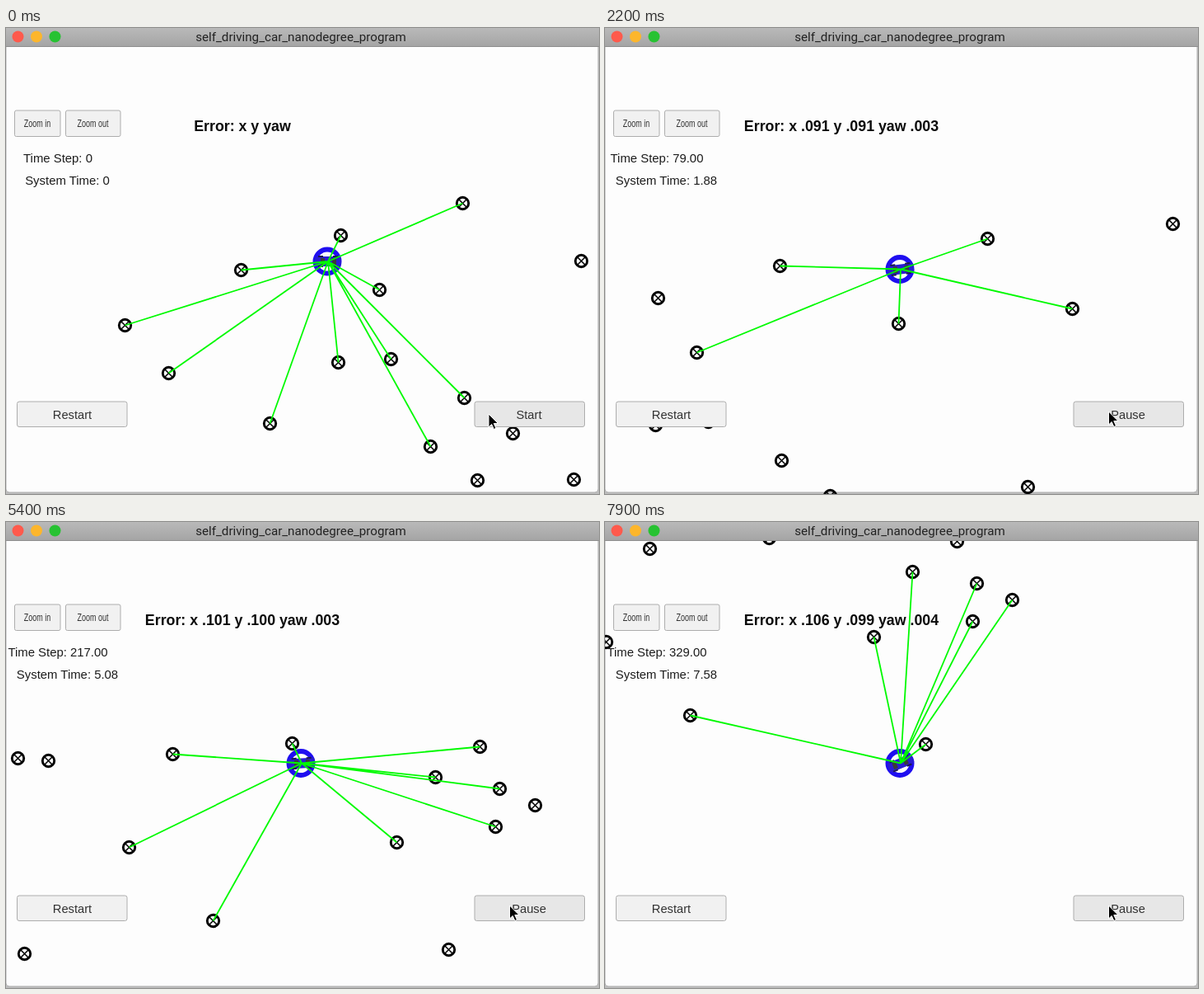
Write an HTML page that moves like this. It is 720 by 565 pixels and loops after 8000 ms.

```html
<!DOCTYPE html>
<html lang="en">
<head>
<meta charset="utf-8">
<title>Particle filter simulator</title>
<style>
  html, body { margin: 0; width: 100%; height: 100%; overflow: hidden; background: #bdbdbd; }
  svg { display: block; width: 720px; height: 565px; font-family: "Liberation Sans", Arial, sans-serif; }
  text { text-anchor: middle; fill: #1c1c1c; font-size: 14.9px; }
  .button rect { fill: #f1f1f1; stroke: #adadad; stroke-width: 1; }
  .button .hover { fill: #e7e7e7; }
  .button text { fill: #323232; font-size: 14.7px; }
  .title { font: 15.16px Roboto, sans-serif; fill: #222; }
  .error { font-size: 17.8px; font-weight: bold; fill: #0c0c0c; }
  .button .small { font-size: 12px; }
</style>
</head>
<body>
<svg viewBox="0 0 720 565">
  <defs>
    <linearGradient id="bar" x2="0" y2="1">
      <stop offset="0" stop-color="#b9b9b9"/>
      <stop offset="1" stop-color="#a5a5a5"/>
    </linearGradient>
    <g id="mark" fill="none" stroke="#000">
      <circle r="7.200" stroke-width="2.900"/>
      <path d="M-4.500-4.500 4.500 4.500M4.500-4.500-4.500 4.500" stroke-width="1.500"/>
    </g>
  </defs>
  <rect y="-10" width="719" height="573" rx="4" fill="#fdfdfd" stroke="#b0b0b0"/>

  <g id="world">
    <g id="marks"></g>
    <g id="vehicle">
      <circle cx="-1" r="14.500" fill="#fdfdfd" stroke="#1f0ef0" stroke-width="6"/>
      <g id="car">
        <rect x="-16" y="-6" width="32" height="12" rx="3" fill="#2a1cd2"/>
        <path d="M-9-4h5v8h-5zM5-4h5v8H5z" fill="#3a3a3a"/>
        <path d="M-12-6h6M6-6h6M-12 6h6M6 6h6" stroke="#1c1a4c" stroke-width="2"/>
      </g>
    </g>
    <path id="rays" fill="none" stroke="#00fa00" stroke-width="1.800"/>
  </g>

  <rect width="720" height="22" fill="url(#bar)"/>
  <path d="M0 22.500h720" stroke="#8e8e8e"/>
  <circle cx="14.500" cy="10.500" r="7" fill="#ff5a4c"/>
  <circle cx="37" cy="10.500" r="7" fill="#fdb62c"/>
  <circle cx="59.500" cy="10.500" r="7" fill="#27c232"/>
  <text class="title" x="358" y="16">self_driving_car_nanodegree_program</text>

  <g class="button">
    <rect x="10.500" y="100" width="55.500" height="31.500" rx="2"/>
    <rect x="72.500" y="100" width="66.500" height="31.500" rx="2"/>
    <rect x="13.500" y="453" width="133.500" height="30.500" rx="2.500"/>
    <rect class="hover" x="569" y="453" width="133.500" height="30.500" rx="2.500"/>
    <text class="small" transform="translate(38 120) scale(.75 1)">Zoom in</text>
    <text class="small" transform="translate(105.500 120) scale(.75 1)">Zoom out</text>
    <text x="80.500" y="474">Restart</text>
    <text id="run" x="635" y="474"></text>
  </g>
  <text id="error" class="error" x="287" y="125"></text>
  <text id="step" x="63" y="163"></text>
  <text id="clock" x="74.500" y="189.500"></text>
  <path id="cursor" d="M0 0v16l3.700-3.500 2.700 6 2.600-1.200-2.700-5.800h5.200z" fill="#000" stroke="#fff" stroke-width="1"/>
</svg>
<script>
const LOOP = 8, TICK = 0.1, START = 0.4, RANGE = 270;
const EYE = [359, 292.5];
const IDLE = [390.5, 282.5];
const REST = [0.5, 0.5];

const landmarks = [
  [554, 212], [406, 251], [285, 293], [698, 282], [453, 317], [144, 360], [197, 418],
  [403, 405], [467, 401], [320, 479], [556, 448], [515, 507], [615, 491], [572, 548],
  [689, 547], [806, 179], [909, 264], [1031, 161], [855, 480], [1174, 244], [1280, 137],
  [1317, 140], [1468, 132], [1613, 119], [1415, 245], [1098, 368], [1288, 374], [1517, 334],
  [1841, 123], [1787, 160], [1865, 174], [1908, 194], [1860, 220], [1740, 239], [1803, 369]
];

// time, position, velocity, step, error in thousandths
const route = [
  { t: 0.4, p: [390, 283], v: [95, -38], step: 0, err: [80, 60] },
  { t: 0.9, p: [446.5, 264], v: [134, -36], step: 21, err: [88, 71] },
  { t: 2.2, p: [700.5, 216], v: [254, -33], step: 79, err: [91, 91] },
  { t: 4.2, p: [1283.5, 168], v: [305, -20], step: 169, err: [102, 104] },
  { t: 5.4, p: [1624.5, 143], v: [240, -13], step: 217, err: [101, 100] },
  { t: 6.4, p: [1830.5, 167], v: [122, 145], step: 262, err: [102, 100] },
  { t: 7.9, p: [1772.5, 392], v: [-162, 66], step: 329, err: [106, 99] }
];

const $ = id => document.getElementById(id);
const mix = (a, b, u) => a + (b - a) * u;
const move = (el, [x, y]) => el.setAttribute('transform', `translate(${x} ${y})`);
const decimals = n => '.' + String(Math.round(n)).padStart(3, '0');

landmarks.forEach(p => {
  const use = document.createElementNS('http://www.w3.org/2000/svg', 'use');
  use.setAttribute('href', '#mark');
  move(use, p);
  $('marks').appendChild(use);
});

// Cubic Hermite curve between neighbouring route points
function drive(t) {
  let i = 0;
  while (i < route.length - 2 && t >= route[i + 1].t) i++;
  const a = route[i], b = route[i + 1], span = b.t - a.t;
  const u = (t - a.t) / span, u2 = u * u, u3 = u2 * u;
  const pos = [0, 1].map(k =>
    mix(a.p[k], b.p[k], 3 * u2 - 2 * u3) +
    span * (a.v[k] * (u3 - 2 * u2 + u) + b.v[k] * (u3 - u2)));
  const vel = [0, 1].map(k =>
    (b.p[k] - a.p[k]) * (6 * u - 6 * u2) / span +
    a.v[k] * (3 * u2 - 4 * u + 1) + b.v[k] * (3 * u2 - 2 * u));
  return {
    pos,
    angle: Math.atan2(vel[1], vel[0]) * 180 / Math.PI,
    step: Math.round(mix(a.step, b.step, u)),
    err: [0, 1].map(k => mix(a.err[k], b.err[k], u))
  };
}

function draw(t) {
  const running = t >= START - 1e-6;
  const car = running ? drive(t) : { pos: IDLE, angle: 0 };
  const [x, y] = car.pos;

  move($('world'), running ? [EYE[0] - x, EYE[1] - y] : REST);
  move($('vehicle'), car.pos);
  $('car').setAttribute('transform', `rotate(${car.angle})`);
  $('rays').setAttribute('d', landmarks
    .filter(([a, b]) => Math.hypot(a - x, b - y) < RANGE)
    .map(([a, b]) => `M${x} ${y}L${a} ${b}`).join('') || 'M0 0');

  $('run').textContent = running ? 'Pause' : 'Start';
  $('step').textContent = 'Time Step: ' + (running ? car.step.toFixed(2) : 0);
  $('clock').textContent = 'System Time: ' + (running ? (t - 0.32).toFixed(2) : 0);
  $('error').textContent = running
    ? `Error: x ${decimals(car.err[0])} y ${decimals(car.err[1])} yaw ${t < 7.2 ? '.003' : '.004'}`
    : 'Error: x y yaw';

  const u = Math.min(t / 0.3, 1);
  move($('cursor'), [mix(586, 611.5, u), mix(468, 465, u)]);
}

const origin = performance.now();
function frame() {
  const t = (performance.now() - origin) / 1000 % LOOP;
  draw(Math.floor(t / TICK + 1e-6) * TICK);
  requestAnimationFrame(frame);
}
frame();
</script>
</body>
</html>
```
